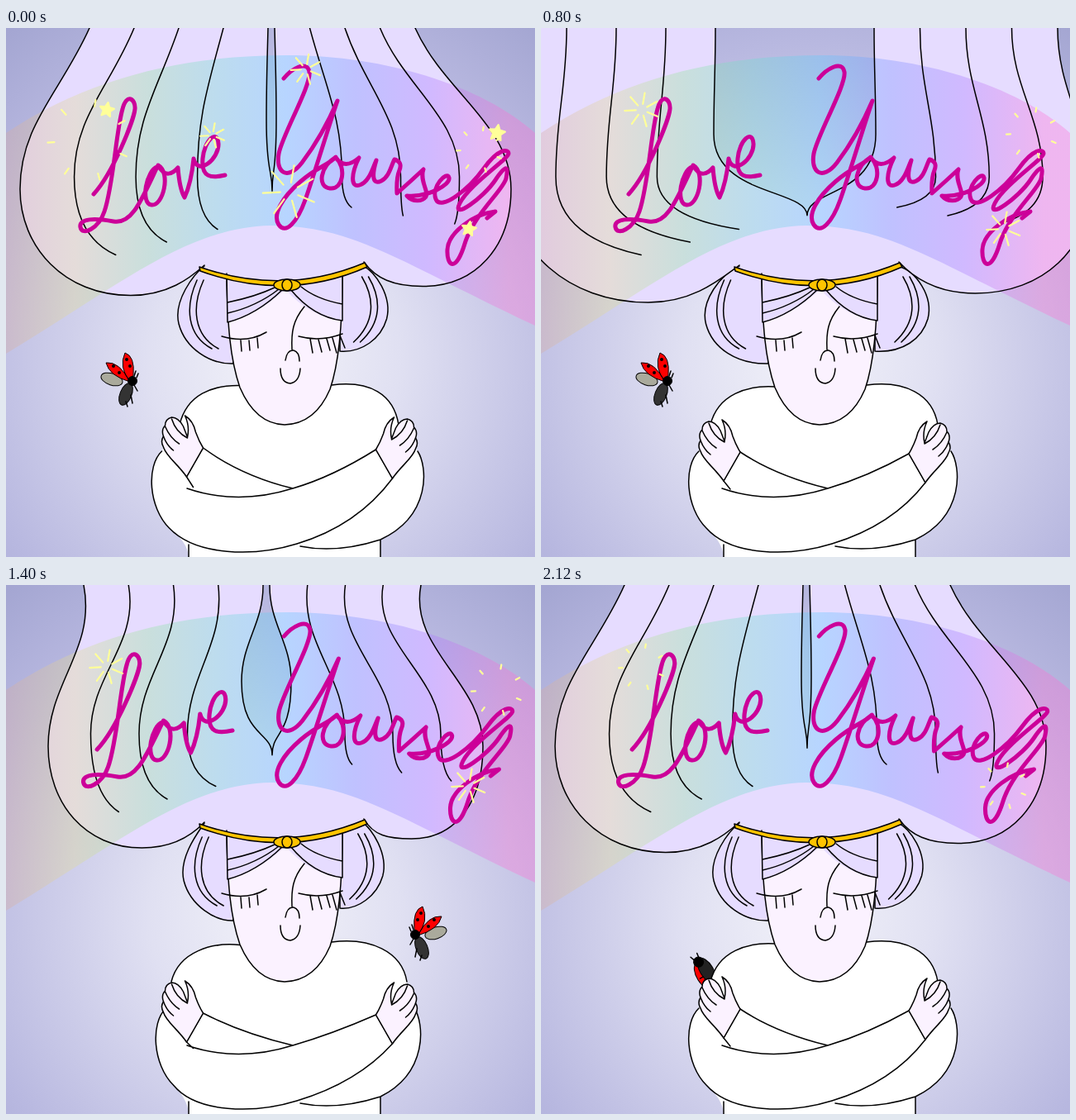
Write an HTML page that moves like this. It is 640x640 px and loops after 2.16 s.

```html
<!DOCTYPE html>
<html lang="en">
<head>
<meta charset="utf-8">
<title>Love Yourself</title>
<style>
  html, body { margin: 0; width: 100%; height: 100%; overflow: hidden; background: #b9b9e2; }
  svg { display: block; width: 100vw; height: 100vh; }
  .ink { fill: none; stroke: #000; stroke-width: 1.5; stroke-linecap: round; stroke-linejoin: round; }
  .lilac { fill: #e6dcff; }
  .skin { fill: #fbf2ff; }
  .white { fill: #fff; }
  .gold { fill: #ffc400; }
  .script { fill: none; stroke: #cc0099; stroke-width: 5; stroke-linecap: round; stroke-linejoin: round; }
</style>
</head>
<body>
<svg viewBox="0 0 640 640">
  <defs>
    <radialGradient id="sky" gradientUnits="userSpaceOnUse" cx="325" cy="400" r="510">
      <stop offset="0" stop-color="#f2f2f9"/>
      <stop offset=".3" stop-color="#e0e0f2"/>
      <stop offset=".75" stop-color="#b8b8e0"/>
      <stop offset="1" stop-color="#a4a6d2"/>
    </radialGradient>
    <linearGradient id="bow">
      <stop offset="0" stop-color="#d8aca0"/>
      <stop offset=".13" stop-color="#e2dc94"/>
      <stop offset=".27" stop-color="#94e49c"/>
      <stop offset=".4" stop-color="#70dcd0"/>
      <stop offset=".53" stop-color="#60c8ff"/>
      <stop offset=".66" stop-color="#7890ff"/>
      <stop offset=".8" stop-color="#a878ff"/>
      <stop offset=".95" stop-color="#ff70d4"/>
    </linearGradient>
    <g id="hand">
      <path class="ink skin" d="M221 548C210 532 196 523 193 512Q189 505 193 499Q190 491 195 486Q195 478 203 476Q211 476 217 487L222 500Q225 487 219 474Q229 480 232 494Q236 505 241 513Z"/>
      <path class="ink" d="M193 499Q197 510 205 516M195 487Q201 501 212 508M203 478Q208 494 222 501"/>
    </g>
    <g id="trunk">
      <ellipse cx="145" cy="443" rx="7" ry="14" transform="rotate(22 145 443)" fill="#333" stroke="#000"/>
      <circle cx="153" cy="427" r="5.5"/>
      <path class="ink" d="M155 432L159 439M151 444L153 454M145 452L147 458M155 421L157 415M158 423L160 418"/>
    </g>
    <g id="openBug" stroke="#000">
      <ellipse cx="128" cy="425" rx="13.5" ry="7" transform="rotate(18 128 425)" fill="#aaaa9c"/>
      <path fill="#f00" d="M150 428Q125 421 121 405Q137 403 150 428Q136 410 144 393Q156 397 154 420Z"/>
      <path stroke-width="4" stroke-linecap="round" d="M130 409h0M137 417h0M146 401h0M150 409h0"/>
      <use href="#trunk"/>
    </g>
    <g id="shutBug" stroke="#000">
      <ellipse cx="130" cy="420" rx="14" ry="6.5" transform="rotate(50 130 420)" fill="#aaaa9c"/>
      <path fill="#f00" d="M151 427Q132 420 131 396Q148 395 154 415Z"/>
      <path stroke-width="4" stroke-linecap="round" d="M137 402h0M146 405h0M139 412h0M148 414h0"/>
      <use href="#trunk"/>
    </g>
    <g id="backBug">
      <g transform="translate(198 468) rotate(-32)" stroke="#000">
        <ellipse cx="-3" cy="4" rx="9" ry="18" fill="#f00"/>
        <ellipse cx="3" rx="8" ry="17" fill="#222"/>
        <circle cy="-14" r="6"/>
        <path class="ink" d="M-3 -18L-5 -24M3 -18L4 -24M-9 4H-5M-8 10L-4 8"/>
      </g>
    </g>
  </defs>
  <rect width="640" height="640" fill="url(#sky)"/>
  <use id="bug"/>
  <path id="torso" class="white"/>
  <path id="sleeves" class="ink"/>
  <use id="handL" href="#hand"/>
  <use id="handR" href="#hand"/>
  <path id="bunL" class="ink lilac"/>
  <path id="bunR" class="ink lilac"/>
  <path id="bunLines" class="ink"/>
  <path id="mane" class="lilac" fill-rule="evenodd"/>
  <path class="ink skin" d="M267 300C268 360 271 400 283 435Q302 479 337 480Q374 479 392 437C403 405 407 360 407 300"/>
  <path class="lilac" d="M267 293L268 356Q305 347 338 316Q368 350 407 354V293Z"/>
  <path class="ink" d="M267 297L268 356Q303 347 334 317M268 345Q303 337 330 316M268 332Q302 325 325 314M407 297V354Q372 350 344 316M407 334Q375 328 357 313"/>
  <path class="ink" d="M361 337C347 354 345 368 346 389M338 402Q340 389 348 390Q355 392 355 403M332 412Q332 429 344 430Q355 428 356 412"/>
  <path class="ink" d="M261 373Q291 382 315 368M284 378L285 391M294 378L295 390M304 375L305 387M354 373Q380 380 407 370M368 376L371 393M378 377L382 392M388 376L392 390M395 375L400 393M404 372L410 387"/>
  <path d="M0 127C100 60 215 33 340 33C465 33 580 73 640 127V360C470 280 420 239 320 239C220 241 140 309 0 394Z" fill="url(#bow)" opacity=".35"/>
  <path id="strands" class="ink"/>
  <path class="ink gold" d="M234 289Q336 325 434 284L437 289Q340 332 235 294Z"/>
  <ellipse class="ink gold" cx="340" cy="311" rx="16" ry="7"/>
  <ellipse class="ink gold" cx="340" cy="311" rx="6" ry="7"/>
  <path id="love" class="script" d="M106 201C130 175 155 110 156 98S146 78 141 98C133 125 130 190 119 222C112 243 92 252 90 241S108 230 130 234S163 210 183 168C170 172 162 212 176 214S200 175 184 166C192 182 202 176 208 169Q210 195 216 205Q224 188 227 158C232 180 258 158 257 140S240 135 238 158S248 182 265 178"/>
  <path id="yourself" class="script" d="M336 61C345 50 364 38 367 53S334 130 330 152S340 186 358 163Q383 130 401 88C390 120 372 180 362 208S338 250 330 238S334 205 356 186S390 166 399 156C380 168 376 192 392 194S412 168 399 157Q410 172 427 157C418 175 416 194 428 190S444 168 448 160C442 180 444 190 454 185S466 166 470 159Q480 162 476 172T473 200Q490 185 505 171C500 185 512 198 508 204S492 211 485 203C510 205 538 190 536 181S514 192 520 207S560 195 578 170S608 146 608 152S560 190 549 212S578 205 592 184S608 168 605 182S566 225 555 261S533 288 534 268S565 225 592 222L582 230"/>
  <g id="sparks" fill="#ffff99" stroke="#ffff99" stroke-width="2.2" stroke-linecap="round" stroke-linejoin="round"></g>
</svg>
<script>
const LOOP = 2160, HALF = 1080, STEP = 40, SPARKLE = 600, TAU = Math.PI * 2;
const $ = id => document.getElementById(id);
const set = (id, d) => $(id).setAttribute('d', d);
const place = (id, transform) => $(id).setAttribute('transform', transform);
const lerp = (a, b, k) => a + (b - a) * k;

// A stroke is a list of points: a start, then two handles and an end per curve.
const path = (stroke, start = 'M') =>
  start + stroke[0] + 'C' + stroke.slice(1).join(' ');

// Hair: time, half widths at the top and the bulge, the parting's middle,
// its half widths at the top and the bulge, its depth, and outward sway.
const hairKeys = [
  [0, 197, 297, 321, 4, 6, .93, 35],
  [440, 277, 390, 295, 130, 168, 1.05, 90],
  [800, 327, 350, 307, 96, 98, 1.07, 0],
  [1040, 281, 299, 316, 52, 80, 1, -30],
  [1400, 204, 263, 315, 4, 30, .97, -15],
  [1840, 138, 244, 326, 0, 0, 0, 15]
];
hairKeys.push([2120, ...hairKeys[0].slice(1)], [LOOP, ...hairKeys[0].slice(1)]);

// Where locks end: from the outermost to the parting.
const sides = [
  { dir: -1, corner: [240, 287], from: [85, 290], to: [320, 228], sag: 316 },
  { dir: 1, corner: [433, 283], from: [602, 247], to: [360, 207], sag: 305 }
];

function hairAt(t) {
  const i = hairKeys.findIndex((key, n) => t < hairKeys[n + 1][0]);
  const a = hairKeys[i], b = hairKeys[i + 1];
  return a.map((v, n) => lerp(v, b[n], (t - a[0]) / (b[0] - a[0])));
}

function hairSide({ dir, corner, from, to, sag }, pose) {
  const [, topHalf, bulgeHalf, mid, gapTop, gapBulge, depth, sway] = pose;
  const outerTop = 298 + dir * topHalf, outerBulge = 314 + dir * bulgeHalf;
  const fall = (top, bulge, y, lean) =>
    [[top, 0], [top + dir * lean, y * .4], [bulge, y * .6], [bulge, y]];

  const low = sag + (bulgeHalf * 2 - 500) * .08;
  const bottom = lerp(outerBulge, corner[0], .6);
  const outline = [...fall(outerTop, outerBulge, 195, sway),
    [outerBulge, 265], [lerp(outerBulge, bottom, .4), low], [bottom, low],
    [lerp(bottom, corner[0], .5), low], [lerp(bottom, corner[0], .8), 303], corner];

  const innerTop = mid + dir * gapTop, innerBulge = mid + dir * gapBulge;
  const parting = [...fall(innerTop, innerBulge, 120 * depth, sway * .4 * Math.min(1, gapTop / 50)),
    [innerBulge, 190 * depth], [322, 182 * depth], [322, 212 * depth]];

  const locks = [.25, .5, .75].map(k => {
    const x = lerp(outerBulge, innerBulge, k - .03), y = 180;
    const end = [lerp(lerp(from[0], to[0], k), x, .18), lerp(from[1], to[1], k)];
    return [...fall(lerp(outerTop, innerTop, k), x, y, sway * (1 - k * .6)),
      [x, lerp(y, end[1], .6)], [lerp(x, end[0], .45), lerp(y, end[1], .87)], end];
  });
  return { outline, parting, locks, outerBulge };
}

function drawHair(t) {
  const pose = hairAt(t);
  const [L, R] = sides.map(side => hairSide(side, pose));
  set('mane', path(L.outline) + 'Q340 337 433 283' + path([...R.outline].reverse(), 'L') + 'Z' +
    path(L.parting) + path([...R.parting].reverse(), 'L') + 'Z');
  set('strands', [L, R].flatMap(s => [s.outline, s.parting, ...s.locks]).map(s => path(s)).join(''));

  // The side buns follow the swing of the bulges.
  const x = 204 + L.outerBulge * .18, X = 377 + R.outerBulge * .14;
  set('bunL', `M240 288C${x + 20} 298 ${x - 5} 330 ${x + 2} 358C${x + 10} 388 ${x + 40} 407 275 406V300`);
  set('bunR', `M432 288C${X - 16} 294 ${X + 5} 325 ${X - 2} 352C${X - 9} 376 ${X - 32} 393 404 391V300`);
  set('bunLines', [24, 32].map(n =>
    `M${x + n} 305C${x + n - 15} 338 ${x + n - 12} 372 ${x + n + 18} 388` +
    `M${X - n} 301C${X - n + 16} 328 ${X - n + 16} 356 ${X - n - 10} 380`).join(''));
}

function drawBody(t) {
  const breath = Math.round(Math.cos(Math.floor(t % 540 / 135) * TAU / 4));
  const s = 5 * breath, hx = -2.5 * Math.abs(breath), hy = -5 * breath;
  const l = -2.5 * breath, r = 2 * breath;
  const cuffL = [241 + hx, 513 + hy], cuffR = [445 - hx, 515 + hy];
  const shoulderL = `M283 ${434 - s * .3}C250 432 ${214 + s} 443 ${205 + s} 480`;
  const shoulderR = `C440 426 ${474 - s} 443 ${480 - s} 480`;
  const elbowL = `L${191 + l} 512C${172 + l} 530 ${175 + l} 580 ${200 + l} 605`;
  const elbowR = `C${508 + r} 530 ${513 + r} 590 453 619`;
  set('torso', `${shoulderL}${elbowL}Q220 622 221 640H453V619` +
    `C${513 + r} 590 ${508 + r} 530 ${496 + r} 512L${480 - s} 480C${474 - s} 443 440 426 394 432Z`);
  set('sleeves', `${shoulderL}M394 432${shoulderR}M${191 + l} 512${elbowL}` +
    `C230 639 300 640 352 624Q425 602 ${465 - hx} ${550 + hy}L${cuffR}Q395 543 347 557Q280 578 219 557` +
    `M${cuffL}L${221 + hx} ${548 + hy}L${229 + hx} ${558 + hy / 2}M${cuffL}Q285 542 347 557` +
    `M${496 + r} 512${elbowR}Q400 636 356 627M221 625V640M453 619V640`);
  place('handL', `translate(${hx} ${hy})`);
  place('handR', `translate(${686 - hx} ${hy + 2}) scale(-1 1)`);
}

function drawText(t) {
  const alt = t % 360 >= 180;
  place('love', alt ? 'translate(1 -2) scale(1.03 1)' : '');
  place('yourself', alt ? 'translate(-5 1) scale(1.016 1)' : '');
}

// Each half loop: hover beside one shoulder, dive behind it, climb out on the other.
function drawBug(t) {
  const p = t % HALF, right = t >= HALF, climbing = p >= 1000;
  const mirrored = right !== climbing;
  const shut = p / STEP % 2 === 1;
  let x, y, width;
  if (climbing) {
    x = y = (1040 - p) * .3;
    width = 678;
    if (mirrored) y -= 25;
  } else {
    const dive = Math.max(0, (p - 820) / 140);
    x = 75 * dive;
    y = 45 * dive + (shut ? 3 + 8 * Math.cos((p - 440) / 640 * TAU) : 0) - (mirrored ? 4 : 0);
    width = 648;
  }
  $('bug').setAttribute('href', climbing ? '#backBug' : shut ? '#shutBug' : '#openBug');
  $('bug').style.display = p >= 960 && !climbing ? 'none' : '';
  place('bug', mirrored ? `translate(${width - x} ${y}) scale(-1 1)` : `translate(${x} ${y})`);
}

// x, y, size and birth; each is a star, then rays, then flying dashes.
const sparks = [
  [100, 136, 16, 370], [122, 99, 9, 590], [250, 130, 6.5, 420], [363, 50, 8, 400],
  [343, 198, 14, 420], [573, 147, 9, 360], [594, 127, 10, 480], [560, 243, 9, 590]];
const polar = (x, y, r, a) => `${x + r * Math.cos(a)} ${y + r * Math.sin(a)}`;

function spark([x, y, r, birth], t) {
  const age = (t - birth + SPARKLE) % SPARKLE;
  if (age >= 340) return '';
  let d = '';
  if (age < 150) {
    for (let i = 0; i < 10; i++) d += (i ? 'L' : 'M') + polar(x, y, i % 2 ? r * .48 : r, i * TAU / 10 - 1.4);
    return `<path d="${d}Z"/>`;
  }
  const [from, to] = age < 230 ? [.8, 2.3] : [2.6, 3.1];
  for (let i = 0; i < 7; i++) {
    const a = i * TAU / 7 - .5;
    d += `M${polar(x, y, r * from, a)}L${polar(x, y, r * to, a)}`;
  }
  return `<path d="${d}"/>`;
}

function draw(now) {
  const t = Math.floor(now % LOOP / STEP) * STEP;
  drawHair(t);
  drawBody(t);
  drawText(t);
  drawBug(t);
  $('sparks').innerHTML = sparks.map(s => spark(s, t % SPARKLE)).join('');
}

const start = performance.now();
(function tick() {
  draw(performance.now() - start);
  requestAnimationFrame(tick);
})();
</script>
</body>
</html>
```
